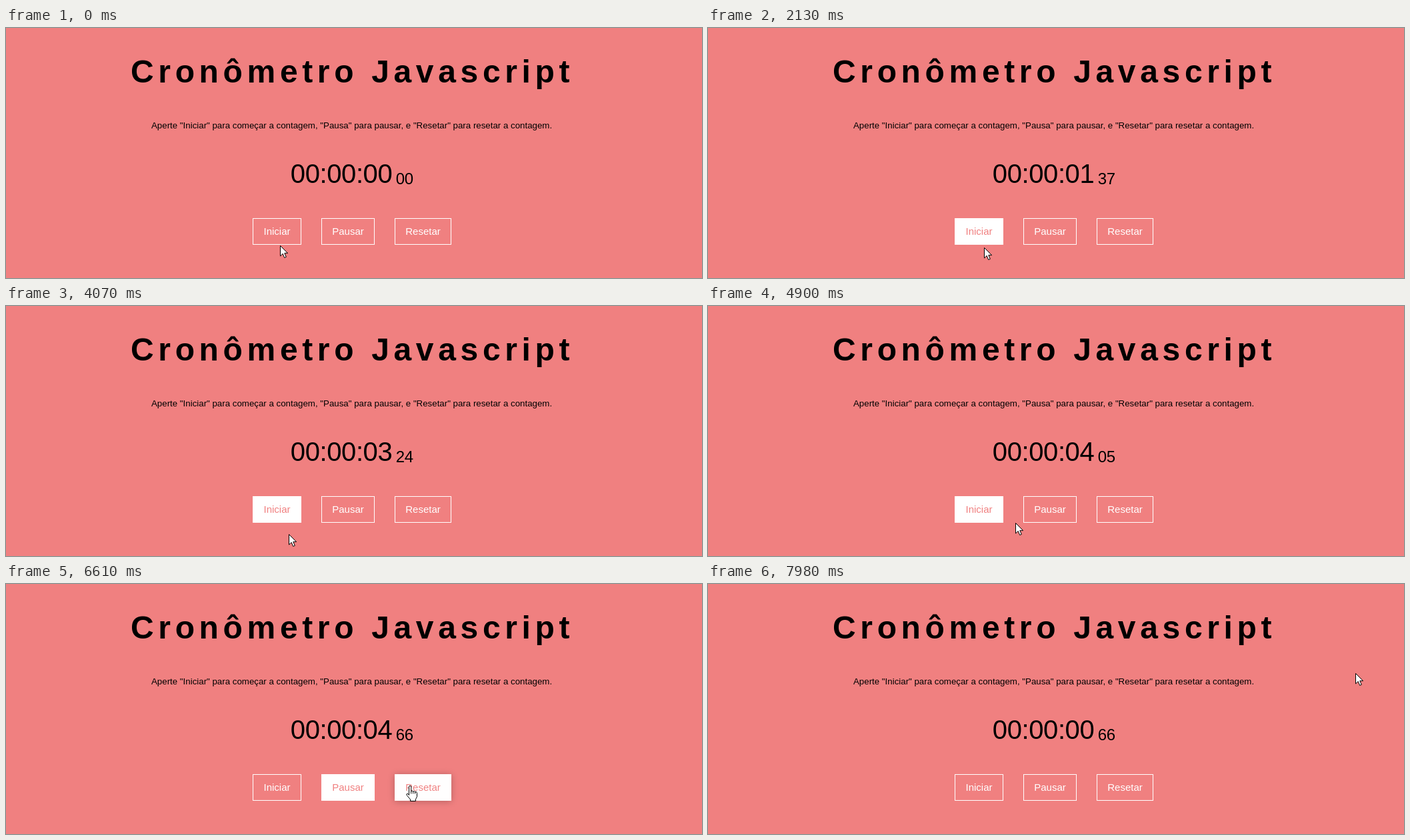
An HTML page for the animation above (8000 ms loop, 1044 px wide and 376 px high).

```html
<!DOCTYPE html>
<html lang="pt">
<head>
<meta charset="utf-8">
<title>Cronômetro</title>
<style>
  html, body { margin: 0; width: 100%; height: 100%; overflow: hidden; background: #f08080; }
  body { position: relative; font-family: "Liberation Sans", Arial, sans-serif; }
  svg { position: absolute; left: 0; top: 0; width: 1044px; height: 376px; }
  .btn {
    position: absolute; top: 286px; height: 40px; box-sizing: border-box;
    border: 1px solid #fff; font-size: 15px; line-height: 38px; text-align: center;
    white-space: nowrap;
  }
</style>
</head>
<body>
<svg viewBox="0 0 1044 376">
  <text x="187" y="82" font-size="48" font-weight="bold" letter-spacing="6.65">Cronômetro Javascript</text>
  <text x="218" y="151" font-size="13.3">Aperte "Iniciar" para começar a contagem, "Pausa" para pausar, e "Resetar" para resetar a contagem.</text>
  <text id="clock" x="426.8" y="232.5" font-size="40" letter-spacing="-.4">00:00:00</text>
  <text id="cents" x="584.8" y="235" font-size="24" letter-spacing="-.5">00</text>
</svg>
<div class="btn" style="left:370px;width:73px">Iniciar</div>
<div class="btn" style="left:473px;width:80px">Pausar</div>
<div class="btn" style="left:583px;width:85px">Resetar</div>
<svg viewBox="0 0 1044 376">
  <g id="cursor" fill="#fff" stroke="#000" stroke-linejoin="round">
    <path id="arrow" d="M.5 .5V16l3.7-3.5 2.5 6 2.6-1.1-2.5-5.7h4.8z"/>
    <g id="hand" transform="translate(-6 -1)">
      <path d="M4.5 14.5V2.1a1.6 1.6 0 0 1 3.2 0V8.6q1.6-1.2 3 .4 1.6-.9 2.9.6 2.9-.7 2.9 2v5.2l-2 4v2.7H6.5V21L1.2 14.6q-1-2 .9-2.3 1.2 0 2.4 2.2z"/>
      <path d="M7.7 8.5v4M10.7 9v3.5M13.6 9.6v3" fill="none"/>
    </g>
  </g>
</svg>
<script>
const LOOP = 8000;
const TICK = 68.8, PHASE = 59.2;   // screen refresh
const START = 713, RATE = 0.09735, STOP = 466;   // stopwatch, in hundredths
const PAUSE = 5530, RESET = 7020;
const FADE = 300;

// Pointer moves: from, to, x, y, bend of the vertical motion
const home = [411, 327];
const moves = [
  [0, 50, 411, 326],
  [400, 680, 399, 317],
  [880, 1100, 411, 319],
  [1700, 1990, 414, 330],
  [2150, 2500, 424, 343],
  [4500, 5207, 494, 302, 1.39],
  [6060, 6400, 606, 304],
  [7200, 7965, 971, 134, 3.7]
];

// Lit and hovered spans of each button
const spans = [
  { lit: [430, PAUSE], hover: [430, 1885] },
  { lit: [4995, RESET], hover: [4995, 6240] },
  { lit: [6330, 7330], hover: [6330, 7330] }
];
const buttons = [...document.querySelectorAll('.btn')].map((el, i) => ({
  el, left: el.offsetLeft, right: el.offsetLeft + el.offsetWidth, ...spans[i]
}));

const $ = id => document.getElementById(id);
const clock = $('clock'), cents = $('cents'), cursor = $('cursor'), arrow = $('arrow'), hand = $('hand');
const two = n => String(n).padStart(2, '0');
const clamp = (v, lo, hi) => Math.min(hi, Math.max(lo, v));
const ease = u => 1 - (1 - clamp(u, 0, 1)) ** 2;
const level = (t, [on, off]) => ease((t - on) / FADE) - ease((t - off) / FADE);

function pointerAt(t) {
  let [x, y] = home;
  for (const [from, to, nx, ny, bend = 1] of moves) {
    const u = clamp((t - from) / (to - from), 0, 1);
    x += (nx - x) * u;
    y += (ny - y) * u ** bend;
  }
  return [Math.round(x), Math.round(y)];
}

function draw(t) {
  const count = clamp(Math.floor((t - START) * RATE), 0, STOP);
  clock.textContent = '00:00:' + two(t < RESET ? Math.floor(count / 100) : 0);
  cents.textContent = two(count % 100);

  for (const { el, lit, hover } of buttons) {
    const k = level(t, lit), s = level(t, hover);
    const mix = 255 - 127 * k;
    el.style.backgroundColor = `rgba(255,255,255,${k})`;
    el.style.color = `rgb(${255 - 15 * k},${mix},${mix})`;
    el.style.boxShadow = s > 0 ? `0 1px 10px rgba(0,0,0,${0.25 * s})` : 'none';
  }

  const [x, y] = pointerAt(t);
  const over = y >= 286 && y < 326 && buttons.some(b => x >= b.left && x < b.right);
  cursor.setAttribute('transform', `translate(${x} ${y})`);
  arrow.style.display = over ? 'none' : '';
  hand.style.display = over ? '' : 'none';
}

const origin = performance.now();
function frame() {
  const t = Math.max(0, performance.now() - origin) % LOOP;
  draw(Math.max(0, PHASE + TICK * Math.floor((t - PHASE) / TICK)));
  requestAnimationFrame(frame);
}
frame();
</script>
</body>
</html>
```
